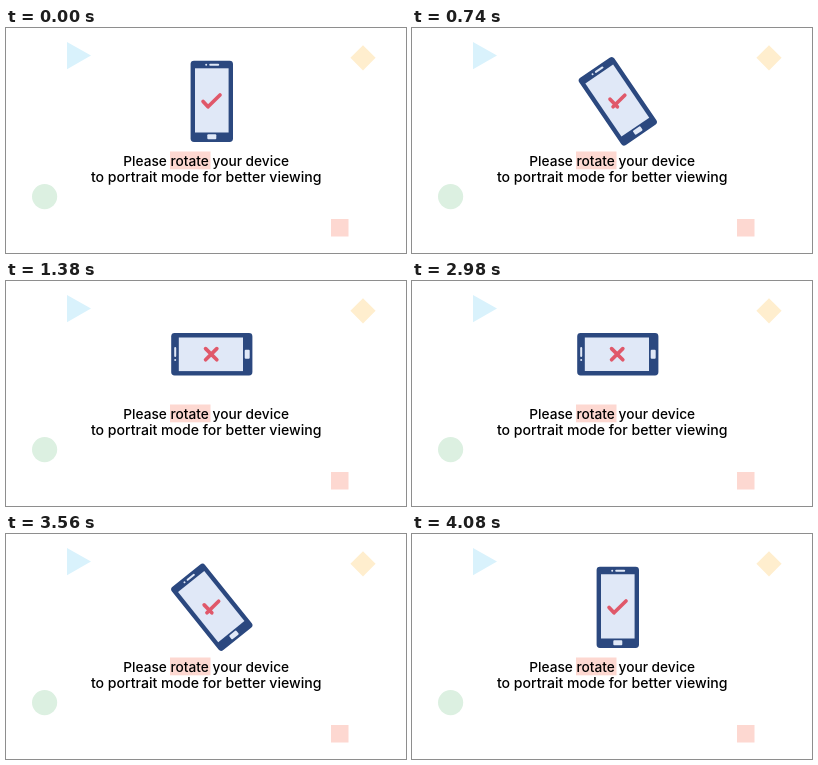
Recreate the animation shown at these times as an HTML page. Size 400 px wide and 225 px high, loop 5.08 s.

```html
<!DOCTYPE html>
<html lang="en">
<head>
<meta charset="utf-8">
<title>Rotate your device</title>
<style>
  html, body { margin: 0; width: 100%; height: 100%; overflow: hidden; background: #fff; }
  svg { display: block; width: 100%; height: 100%; }
  text { font: 500 13.7px Inter, Roboto, sans-serif; text-anchor: middle; fill: #000; }
  .second { font-size: 14.1px; }
  .mark { fill: none; stroke: #e0586a; stroke-width: 3.7; stroke-linecap: round; }
</style>
</head>
<body>
<svg viewBox="0 0 400 225">
  <path d="M61 14L85 27.6L61 41.2Z" fill="#d9f2fc"/>
  <path d="M357 17.2L369.6 29.8L357 42.4L344.4 29.8Z" fill="#ffeece"/>
  <circle cx="38.6" cy="168.6" r="12.6" fill="#dcf0e1"/>
  <rect x="325" y="191" width="17.5" height="17.5" fill="#fdd8d1"/>
  <rect x="164" y="123.5" width="40.5" height="17.8" fill="#fdd8d1"/>

  <g id="phone">
    <rect x="-21.2" y="-40.6" width="42.4" height="81.2" rx="3.4" fill="#2b487f"/>
    <rect x="-16.8" y="-33" width="33.6" height="64.2" fill="#e0e8f7"/>
    <circle cx="-5.6" cy="-36.6" r="1" fill="#e0e8f7"/>
    <rect x="-2.6" y="-37.6" width="10" height="2" rx="1" fill="#e0e8f7"/>
    <rect x="-4.5" y="32.9" width="9" height="5" rx="1" fill="#e0e8f7"/>
  </g>
  <path id="mark" class="mark"/>

  <text x="200.2" y="137.7">Please rotate your device</text>
  <text x="200.2" y="153.7" class="second">to portrait mode for better viewing</text>
</svg>
<script>
  const LOOP = 5080;
  const TURN = [234, 1376];
  const BACK = [2964, 4086];
  // Two strokes, each x1 y1 x2 y2
  const CHECK = [214, 67, 202, 78.8, 197.1, 73.4, 202, 78.8];
  const CROSS = [210.8, 67.6, 199.6, 78.8, 199.6, 67.6, 210.8, 78.8];

  const phone = document.getElementById('phone');
  const mark = document.getElementById('mark');

  const bezier = (s, a, b) => 3 * s * (1 - s) ** 2 * a + 3 * s * s * (1 - s) * b + s ** 3;

  // cubic-bezier(.54, 0, .46, 1), solved by bisection
  function ease(x) {
    let lo = 0, hi = 1;
    for (let i = 0; i < 24; i++) {
      const mid = (lo + hi) / 2;
      if (bezier(mid, 0.54, 0.46) < x) lo = mid; else hi = mid;
    }
    return bezier(lo, 0, 1);
  }

  function progress(t, [from, to]) {
    if (t <= from) return 0;
    if (t >= to) return 1;
    return ease((t - from) / (to - from));
  }

  function draw(t) {
    const k = progress(t, TURN) - progress(t, BACK);
    const p = CHECK.map((v, i) => v + (CROSS[i] - v) * k);
    phone.setAttribute('transform', `translate(205.8 73.3) rotate(${-90 * k})`);
    mark.setAttribute('d', `M${p[0]} ${p[1]}L${p[2]} ${p[3]}M${p[4]} ${p[5]}L${p[6]} ${p[7]}`);
  }

  const start = performance.now();
  function tick() {
    draw((performance.now() - start) % LOOP);
    requestAnimationFrame(tick);
  }
  tick();
</script>
</body>
</html>
```
